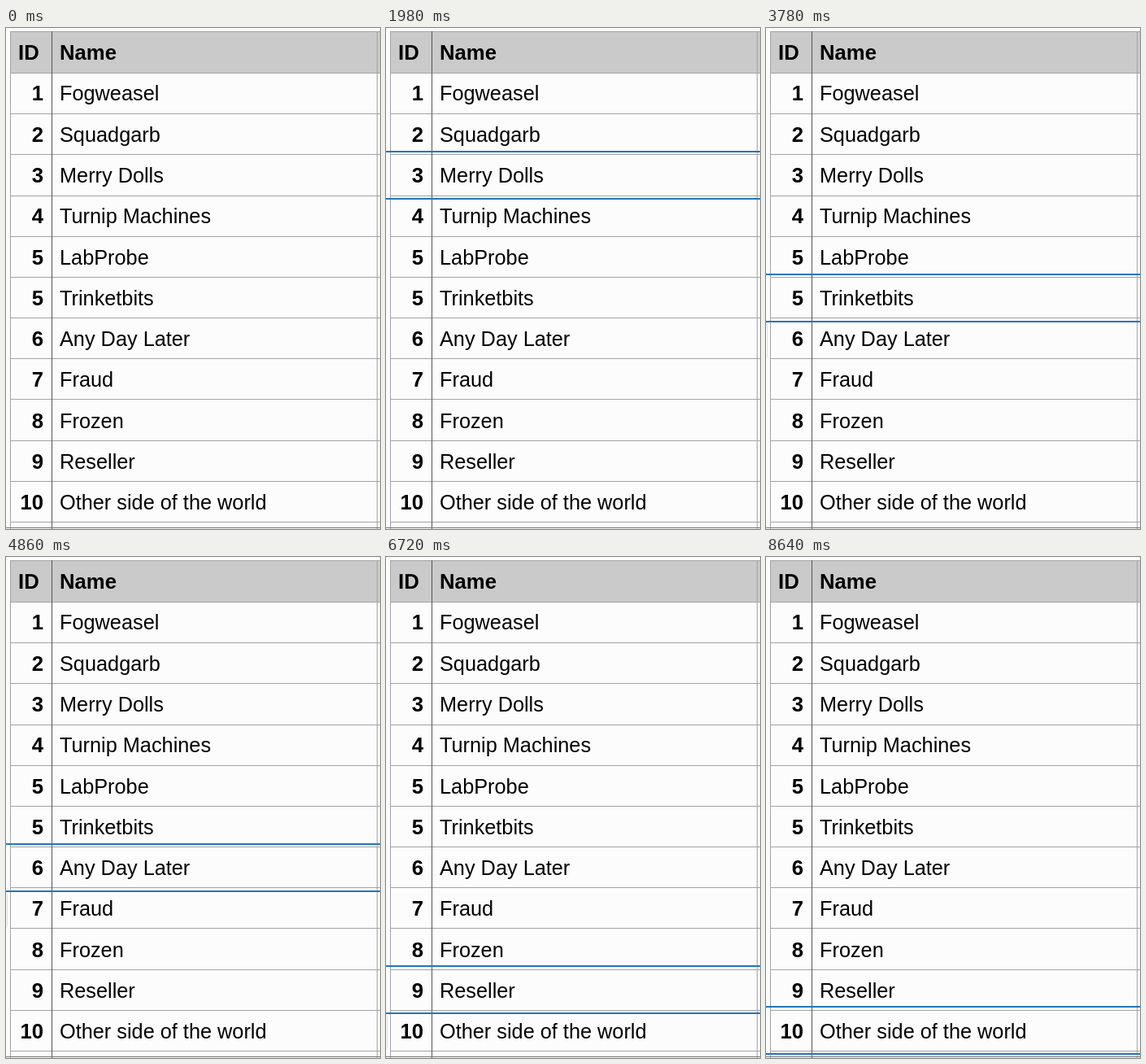
Animation of 460 by 616 pixels, one loop 8.7 s. Source, as an HTML page with a canvas:

```html
<!DOCTYPE html>
<html lang="en">
<head>
<meta charset="utf-8">
<title>Table scan</title>
<style>
  html, body { margin: 0; width: 100%; height: 100%; overflow: hidden; background: #fcfcfc; }
  canvas { display: block; }
</style>
</head>
<body>
<canvas id="stage" width="460" height="616"></canvas>
<script>
const ctx = document.getElementById('stage').getContext('2d');
const W = 460, H = 616, LOOP = 8700;
const START = 300, STEP = 690;
const FONT = '"Liberation Sans", Arial, sans-serif';
const PAPER = '#fcfcfc', HEAD = '#cacaca', RULE = '#a4a4a6', DARK = '#555', BLUE = '#2277b9';

const rows = [
  [1, 'Fogweasel'], [2, 'Squadgarb'], [3, 'Merry Dolls'], [4, 'Turnip Machines'],
  [5, 'LabProbe'], [5, 'Trinketbits'], [6, 'Any Day Later'], [7, 'Fraud'],
  [8, 'Frozen'], [9, 'Reseller'], [10, 'Other side of the world']
];

function box(color, x, y, w, h) {
  ctx.fillStyle = color;
  ctx.fillRect(x, y, w, h);
}

function label(text, x, y, bold, align = 'left') {
  ctx.font = `${bold ? 'bold 25.7px' : '25.3px'} ${FONT}`;
  ctx.textAlign = align;
  ctx.fillStyle = '#000';
  ctx.fillText(text, x, y);
}

const lineY = i => Math.round(4.95 + i * 50.16);
const textY = i => Math.round(39 + i * 50.3);

function drawTable() {
  box(PAPER, 0, 0, W, H);
  box(HEAD, 5, 4, W - 5, lineY(1) - 4);
  box(RULE, 5, 4, W - 5, 1);
  for (let i = 1; i <= rows.length + 1; i++) box(RULE, 5, lineY(i), W - 5, 1);
  box(RULE, 5, 4, 1, H - 4);
  box(DARK, 56, 4, 1, H - 4);
  box(RULE, 456, 4, 1, H - 4);
  box('#777', 0, 614, W, 1);

  label('ID', 15, textY(0), true);
  label('Name', 66, textY(0), true);
  rows.forEach(([id, name], i) => {
    label(id, 46, textY(i + 1), true, 'right');
    label(name, 66, textY(i + 1), false);
  });
}

// Frame around one row; its sides lie outside the stage.
function drawMarker(i) {
  const top = Math.round(101 + (i - 1) * 50.13);
  box(BLUE, 0, top, W, 2);
  box(BLUE, 0, top + 58, W, 2);
  if (i >= 3 && i < rows.length - 1) {
    ctx.strokeStyle = '#e0e0e0';
    ctx.lineWidth = 1;
    ctx.beginPath();
    ctx.moveTo(0, top + 60);
    ctx.quadraticCurveTo(1.5, top + 61, 1.5, top + 64);
    ctx.lineTo(1.5, top + 100);
    ctx.quadraticCurveTo(1.5, top + 103, 0, top + 104);
    ctx.stroke();
  }
}

function frame(now) {
  const t = now % LOOP;
  const row = Math.min(Math.floor((t - START) / STEP), rows.length - 1);
  drawTable();
  if (row >= 0) drawMarker(row);
}

const begin = performance.now();
function tick() {
  frame(performance.now() - begin);
  requestAnimationFrame(tick);
}
tick();
</script>
</body>
</html>
```
